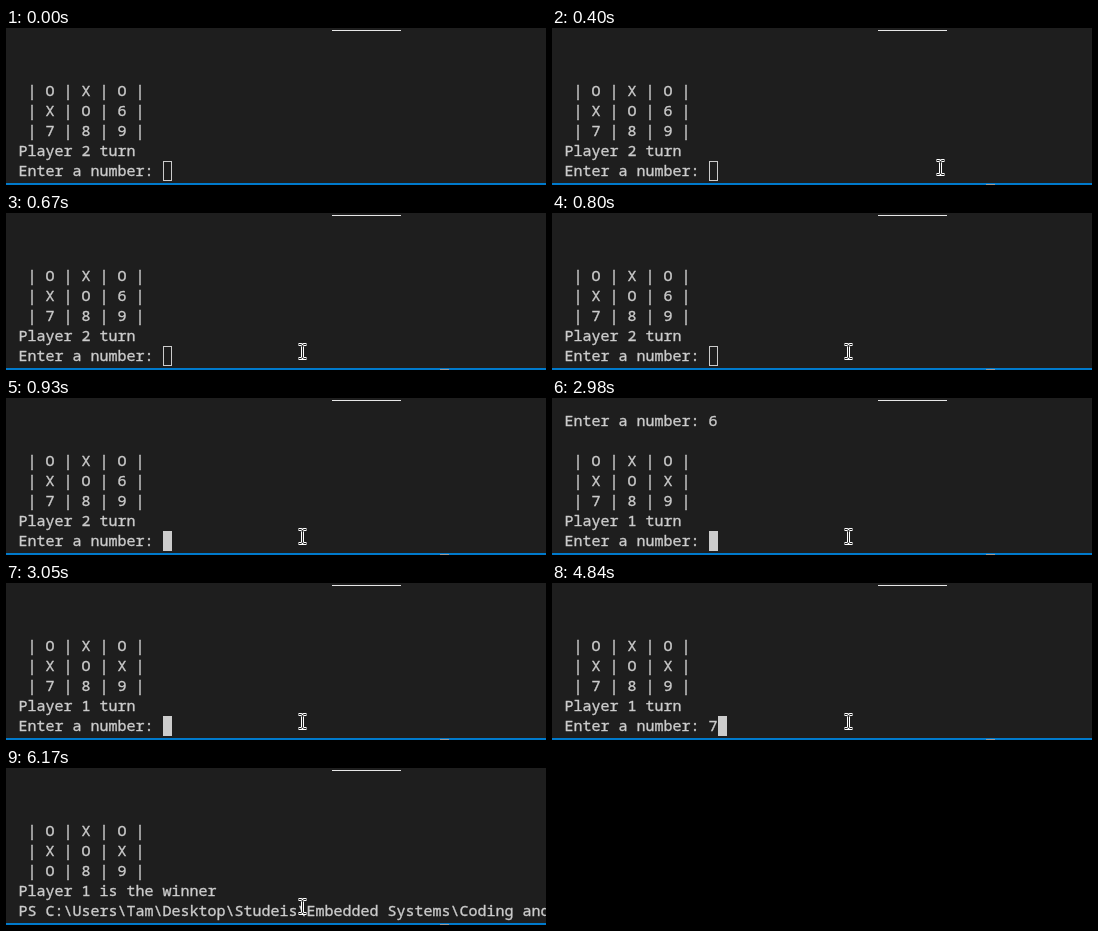
An HTML page for the animation above (8 s loop, 540 by 157 pixels).

```html
<!DOCTYPE html>
<html lang="en">
<head>
<meta charset="utf-8">
<style>
html, body { margin: 0; width: 100%; height: 100%; overflow: hidden; background: #1e1e1e; }
#stage { position: relative; width: 540px; height: 157px; overflow: hidden; }
#stage > * { position: absolute; }
#tab { left: 326px; top: 2px; width: 69px; height: 1px; background: #e7e7e7; }
#bar { left: 0; top: 155px; width: 540px; height: 2px; background: #007acc; }
#mark { left: 434px; top: 156px; width: 9px; height: 1px; background: #999; }
#term { left: 13px; bottom: 4px; margin: 0; color: #ccc; font: 15px/20px "Noto Sans Mono", "DejaVu Sans Mono", monospace; }
#text { position: relative; left: -.5px; top: -1px; -webkit-text-stroke: .35px #ccc; }
#caret { display: inline-block; box-sizing: border-box; width: 9px; height: 20px; vertical-align: top; border: 1px solid #ccc; }
#caret.focus { background: #ccc; }
#mouse { left: 0; top: 0; }
</style>
</head>
<body>
<div id="stage">
  <div id="tab"></div>
  <pre id="term"><span id="text"></span><span id="caret"></span></pre>
  <div id="bar"></div>
  <div id="mark"></div>
  <svg id="mouse" width="540" height="157" fill="none">
    <g id="beam">
      <path d="M-4 -7H-1.5L0 -6L1.5 -7H4M0 -6V6M-4 7H-1.5L0 6L1.5 7H4" stroke="#fff" stroke-width="3"/>
      <path d="M-3.5 -7H-1.5L0 -6L1.5 -7H3.5M0 -6V6M-3.5 7H-1.5L0 6L1.5 7H3.5" stroke="#1e1e1e"/>
    </g>
  </svg>
</div>
<script>
const $ = id => document.getElementById(id);
const LOOP = 8000, ENTER = 260, ARRIVE = 670;

const board = cells => [0, 3, 6]
  .map(i => ' | ' + [...cells.slice(i, i + 3)].join(' | ') + ' |\n').join('');
const prompt = typed => 'Enter a number: ' + typed;
const ask = (cells, player, typed = '') =>
  board(cells) + `Player ${player} turn\n` + prompt(typed);

// [start time, terminal text]
const screens = [
  [0, ask('OXOXO6789', 2)],
  [2500, ask('OXOXO6789', 2, '6')],
  [2980, prompt('6') + '\n\n' + ask('OXOXOX789', 1)],
  [3050, ask('OXOXOX789', 1)],
  [4840, ask('OXOXOX789', 1, '7')],
  [6170, board('OXOXOXO89') + 'Player 1 is the winner\n' +
    'PS C:\\Users\\Tam\\Desktop\\Studeis\\Embedded Systems\\Coding and ']
];

const curve = (a, b, c, u) => a * (1 - u) ** 2 + 2 * b * u * (1 - u) + c * u * u;
let shown;

function draw(now) {
  const t = now % LOOP;
  const text = screens.findLast(s => s[0] <= t)[1];
  if (text !== shown) $('text').textContent = shown = text;
  $('caret').className = t >= 930 ? 'focus' : '';

  // The pointer advances in six discrete hops and leaves a mark where it came in
  const u = Math.min(1, Math.floor((t - ENTER) / (ARRIVE - ENTER) * 6) / 6);
  $('beam').style.display = $('mark').style.display = t < ENTER ? 'none' : '';
  const x = Math.round(curve(438, 360, 296, u)) + 0.5;
  const y = Math.round(curve(163, 116, 138, u)) + 0.5;
  $('beam').setAttribute('transform', `translate(${x} ${y})`);
}

const start = performance.now();
function tick() {
  draw(performance.now() - start);
  requestAnimationFrame(tick);
}
tick();
</script>
</body>
</html>
```
